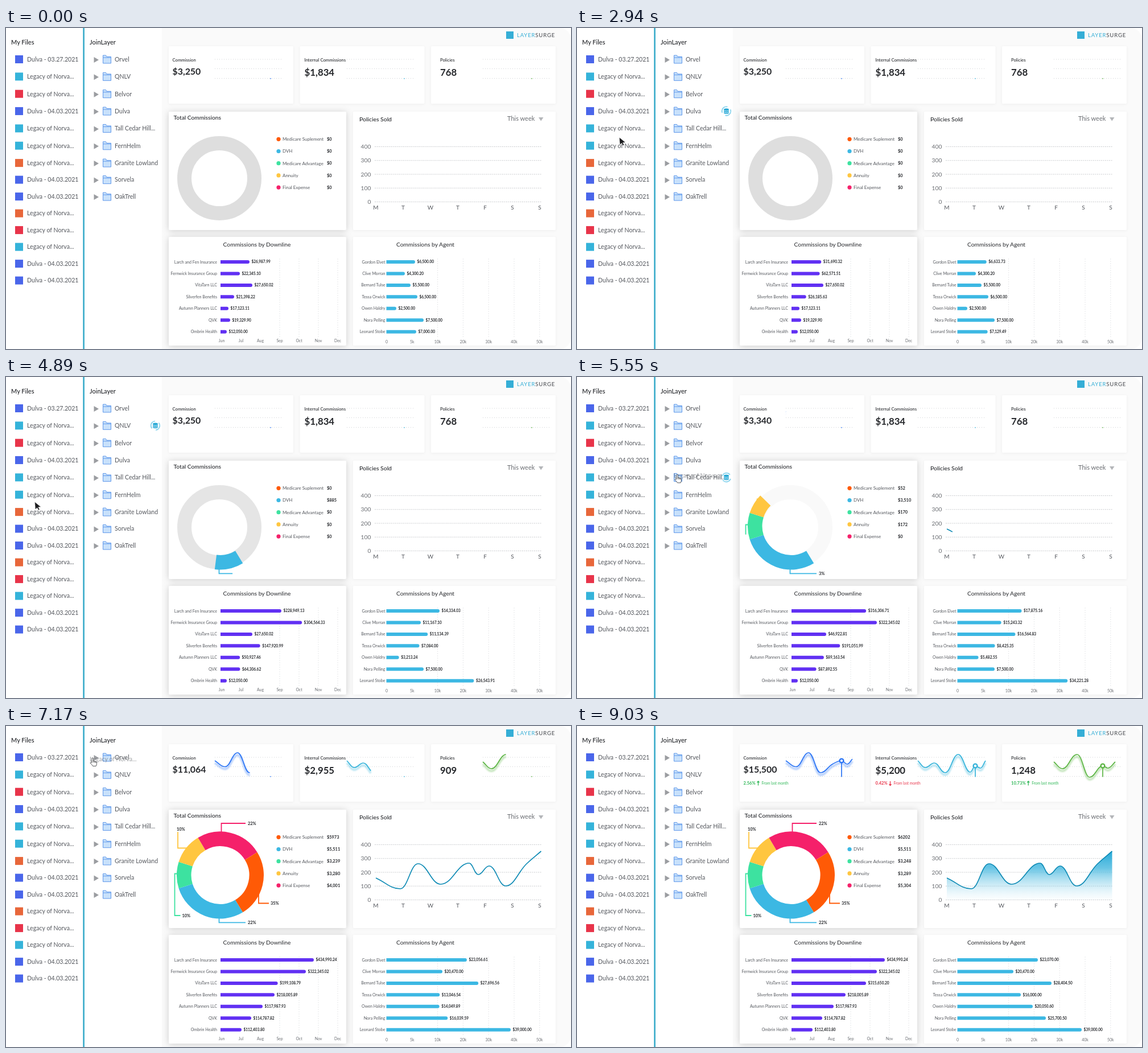
An HTML page that plays this animation: 993 by 564 pixels, repeating every 9930 ms.

```html
<!DOCTYPE html>
<html lang="en">
<head>
<meta charset="utf-8">
<title>Commission dashboard</title>
<style>
  html, body { margin: 0; width: 100%; height: 100%; overflow: hidden; background: #fff; }
  svg { display: block; width: 993px; height: 564px; font-family: Lato, "Open Sans", sans-serif; }
  .card { fill: #fff; filter: drop-shadow(0 1px 2px rgba(0, 0, 0, .05)); }
  .raised { filter: drop-shadow(0 1px 6px rgba(0, 0, 0, .18)); }
  .spin { animation: spin 1s linear infinite; }
  @keyframes spin { to { transform: rotate(360deg); } }
</style>
</head>
<body>
<svg id="stage" viewBox="0 0 993 564">
  <defs>
    <linearGradient id="area" x1="0" y1="0" x2="0" y2="1">
      <stop offset="0" stop-color="#25a9d8"/>
      <stop offset=".35" stop-color="#4fbbe0" stop-opacity=".85"/>
      <stop offset="1" stop-color="#bfe6f4" stop-opacity=".05"/>
    </linearGradient>
    <filter id="soft" x="-10%" y="-30%" width="120%" height="160%"><feGaussianBlur stdDeviation="1"/></filter>
  </defs>
</svg>
<script>
const LOOP = 9930, STEP = 30;
const INK = '#25272b', TEXT = '#55585e', MUTED = '#6a6d72';
const stage = document.getElementById('stage');
const updates = [];

// ---------- helpers ----------
const clamp = v => Math.max(0, Math.min(1, v));
const mix = (a, b, f) => a + (b - a) * f;
const ease = (t, t0, t1) => {
  const u = clamp((t - t0) / (t1 - t0));
  return u * u * (3 - 2 * u);
};
const easeInverse = f => 0.5 - Math.sin(Math.asin(1 - 2 * f) / 3);

function add(tag, attrs, parent = stage) {
  const el = document.createElementNS('http://www.w3.org/2000/svg', tag);
  for (const k in attrs) el.setAttribute(k, attrs[k]);
  parent.append(el);
  return el;
}

// y is the middle of the capital letters
function text(x, y, str, size, fill = TEXT, weight = 400, anchor = 'start', parent = stage) {
  const el = add('text', { x, y: y + size * 0.36, 'font-size': size, fill,
    'font-weight': weight, 'text-anchor': anchor }, parent);
  el.textContent = str;
  return el;
}

const rect = (x, y, width, height, attrs) => add('rect', { x, y, width, height, ...attrs });
const path = (d, attrs, parent) => add('path', { d, fill: 'none', ...attrs }, parent);
const dotted = (x1, y1, x2, y2, stroke, dash) =>
  add('line', { x1, y1, x2, y2, stroke, 'stroke-dasharray': dash });
const money = (v, digits) => '$' + v.toLocaleString('en-US',
  { minimumFractionDigits: digits, maximumFractionDigits: digits });

// Smooth curve through points, flat and round at peaks and valleys
function curve(pts) {
  const secant = pts.slice(1).map((p, i) => (p[1] - pts[i][1]) / (p[0] - pts[i][0]));
  const slope = pts.map((_, i) => {
    const a = secant[i - 1] ?? secant[i], b = secant[i] ?? a;
    return a * b <= 0 ? 0 : (a + b) / 2;
  });
  return pts.slice(1).reduce((d, [x, y], i) => {
    const [px, py] = pts[i], h = (x - px) * 0.42;
    return d + `C${px + h},${py + slope[i] * h} ${x - h},${y - slope[i + 1] * h} ${x},${y}`;
  }, `M${pts[0]}`);
}

// Draws a path from its start between two times
function drawOn(el, t0, t1) {
  const len = el.getTotalLength();
  el.setAttribute('stroke-dasharray', `${len} ${len + 20}`);
  updates.push(t => {
    const f = ease(t, t0, t1);
    el.setAttribute('stroke-dashoffset', len * (1 - f));
    el.setAttribute('visibility', f > 0 ? 'visible' : 'hidden');
  });
}

const fadeIn = (el, t0, t1) => updates.push(t => el.setAttribute('opacity', ease(t, t0, t1)));

// ---------- panels ----------
path('M274 0H973a20 20 0 0 1 20 20V544a20 20 0 0 1-20 20H274Z', { fill: '#fafafa' });
rect(135.3, 0, 2.6, 564, { fill: '#38abc9' });
for (const x of [286, 516.5, 747]) rect(x, 32, 219, 101, { class: 'card', rx: 2 });
for (const [y, h] of [[147, 208], [367, 191]]) {
  rect(286, y, 312, h, { class: 'card raised', rx: 2 });
  rect(610, y, 356, h, { class: 'card', rx: 2 });
}

// ---------- file and folder lists ----------
const rowY = i => 55 + 30.35 * Math.min(i, 6) + 29.5 * Math.max(0, i - 6);
const fileKinds = 'btrbttobbortbb';
const kindColor = { b: '#4a66ea', t: '#35b3da', r: '#e8344a', o: '#e8673a' };
const fileLabel = i => fileKinds[i] === 'b' ? `Dulva - ${i ? '04.03' : '03.27'}.2021` : 'Legacy of Norva...';

text(9, 25, 'My Files', 11, INK, 500);
text(147, 25, 'JoinLayer', 11, INK, 500);
[...fileKinds].forEach((kind, i) => {
  rect(16, rowY(i) - 7, 14, 14, { fill: kindColor[kind] });
  text(37, rowY(i), fileLabel(i), 10.6);
});
['Orvel', 'QNLV', 'Belvor', 'Dulva', 'Tall Cedar Hill...', 'FernHelm', 'Granite Lowland', 'Sorvela', 'OakTrell']
  .forEach((name, i) => {
    const y = rowY(i);
    path(`M154.5 ${y - 4}L163 ${y + 1} 154.5 ${y + 6}Z`, { fill: '#9b9da1' });
    path(`M170.5 ${y + 7}V${y - 7}h5l1.6 2.5h7.4V${y + 7}ZM170.5 ${y - 3}h14`,
      { fill: '#c8e1fb', stroke: '#5f98ea', 'stroke-width': 1 });
    text(191, y, name, 10.6);
  });

// ---------- brand ----------
rect(879, 6, 13, 13, { fill: '#35aed6' });
const brand = text(898, 12.5, '', 9.6, '#35aed6');
brand.setAttribute('letter-spacing', 0.8);
brand.innerHTML = 'LAYER<tspan fill="#45484d">SURGE</tspan>';

// ---------- summary cards ----------
// pin is the index of the marked point on the line
function summary({ x, chartX, label, size, valueY, from, to, prefix, count, color, line, draw, pin, change, up, show }) {
  text(x, 56, label, 7.7, INK, 500);
  const value = text(x, valueY, '', size, INK, 700);
  updates.push(t => value.textContent =
    prefix + Math.round(mix(from, to, ease(t, ...count))).toLocaleString('en-US'));

  for (const y of [55, 71.5, 88.5]) dotted(chartX, y, chartX + 119, y, '#cfd1d4', '1 3');
  const points = line.map(([dx, y]) => [chartX + dx, y]), d = curve(points);
  drawOn(path(d, { stroke: color, 'stroke-width': 4, opacity: 0.32, transform: 'translate(0 4)', filter: 'url(#soft)' }), ...draw);
  drawOn(path(d, { stroke: color, 'stroke-width': 1.7 }), ...draw);

  const [px, py] = points[pin];
  const stem = add('line', { x1: px, x2: px, y1: 89.5, stroke: color, 'stroke-width': 1.7 });
  const knob = add('circle', { cx: px, r: 3.4, fill: '#fff', stroke: color, 'stroke-width': 2.4 });
  updates.push(t => {
    const f = ease(t, 7800, 8450), y = mix(88.3, py, f);
    stem.setAttribute('y2', y);
    knob.setAttribute('cy', y);
    knob.setAttribute('opacity', clamp(f * 5));
  });

  const g = add('g', {}), tint = up ? '#2fb757' : '#e8344a';
  text(x, 100.5, change, 7.6, tint, 700, 'start', g);
  const ax = x + 5 + change.length * 4.2;
  path(`M${ax} 97v7.5` + (up ? 'm-2-5.2l2-2.3 2 2.3' : 'm-2-2.3l2 2.3 2-2.3'),
    { stroke: tint, 'stroke-width': 1.3 }, g);
  text(ax + 6, 100.8, 'From last month', 6.6, tint, 400, 'start', g);
  fadeIn(g, ...show);
}

summary({ x: 292.5, chartX: 367, label: 'Commission', size: 15.9, valueY: 76.5, from: 3250, to: 15500, prefix: '$',
  count: [5400, 8385], color: '#2a74f5', draw: [5490, 8490], pin: 5, change: '2.56%', up: true, show: [8300, 8750],
  line: [[0, 61], [18, 71.5], [40, 47], [61, 82], [82, 67], [98, 61], [108, 67], [117, 58]] });
summary({ x: 524.5, chartX: 599, label: 'Internal Commissions', size: 16.8, valueY: 77.5, from: 1834, to: 5200, prefix: '$',
  count: [6300, 8550], color: '#35b3da', draw: [6250, 8770], pin: 6, change: '0.42%', up: false, show: [8500, 9000],
  line: [[0, 61], [13, 73], [29, 65], [48, 82], [71, 50], [92, 81], [101, 70], [110, 74], [119, 61]] });
summary({ x: 763, chartX: 838, label: 'Policies', size: 16.8, valueY: 77.5, from: 768, to: 1248, prefix: '',
  count: [6378, 8586], color: '#5cb544', draw: [6253, 8570], pin: 4, change: '10.73%', up: true, show: [8600, 9030],
  line: [[0, 63], [15, 75], [41, 50], [63, 90], [86, 70], [95, 74], [108, 63]] });

// ---------- total commissions ----------
text(294.5, 157, 'Total Commissions', 10.2, INK, 500);
const ring = add('circle', { cx: 375, cy: 264, r: 61.5, fill: 'none', stroke: '#dedede', 'stroke-width': 25 });
updates.push(t => ring.setAttribute('opacity', 1 - ease(t, 4395, 6015)));

const SWEEP = [4395, 6831], FIRST_ANGLE = 58.7, RADIUS = 63.75;
const sweepTime = deg => mix(...SWEEP, easeInverse((deg - FIRST_ANGLE) / 360));
const polar = deg => {
  const a = deg * Math.PI / 180;
  return [376.5 + RADIUS * Math.cos(a), 262 + RADIUS * Math.sin(a)];
};

const slices = [
  { name: 'DVH', color: '#3cb8e3', end: 162.4, share: 22, leader: 'M374.5 338V345.3H421', tagAt: [425, 345], total: 5511, from: 4395 },
  { name: 'Medicare Advantage', color: '#3de2a0', end: 197.6, share: 10, leader: 'M301 259.5H296.5V333H306.5', tagAt: [309.5, 333], total: 3248, from: 5280 },
  { name: 'Annuity', color: '#ffc640', end: 239.3, share: 10, leader: 'M318 214.5H302V186', tagAt: [300, 181], total: 3289, from: 5280 },
  { name: 'Final Expense', color: '#f5206a', end: 328.2, share: 22, leader: 'M378.5 187V171H421', tagAt: [425, 171], total: 5304, from: 5850 },
  { name: 'Medicare Suplement', color: '#ff5a06', end: 418.7, share: 35, leader: 'M444 296V311.5H462', tagAt: [465, 311.5], total: 6202, from: 5445 }
];
slices.forEach(({ name, color, end, share, leader, tagAt, total, from }, i) => {
  const start = i ? slices[i - 1].end : FIRST_ANGLE;
  const entered = sweepTime(start);
  drawOn(path(leader, { stroke: color, 'stroke-width': 1.8 }), entered, entered + 900);
  const slice = path('', { stroke: color, 'stroke-width': 25.5 });
  const tag = text(...tagAt, '', 7.4, INK, 700);

  const legendY = 195.3 + 21.2 * ((i + 1) % slices.length);
  add('circle', { cx: 479, cy: legendY, r: 3.6, fill: color });
  text(486, legendY, name, 8);
  const value = text(564, legendY, '', 7.4, INK, 700);

  updates.push(t => {
    const tip = Math.min(end, FIRST_ANGLE + 360 * ease(t, ...SWEEP));
    slice.setAttribute('d', tip > start ? `M${polar(start)}A${RADIUS} ${RADIUS} 0 0 1 ${polar(tip)}` : '');
    const counted = 5346 + 181 * i;
    const n = Math.round(share * ease(t, counted, counted + 900));
    tag.textContent = n && t >= entered + 900 ? n + '%' : '';
    const sum = Math.round(total * ease(t, from, from + 1950));
    value.textContent = name.endsWith('Suplement') ? '$' + sum : money(sum, 0);
  });
});

// ---------- policies sold ----------
text(621, 160, 'Policies Sold', 10.4, INK, 500);
text(881, 159.5, 'This week', 11, MUTED);
path('M936 157H944.5L940.2 163.5Z', { fill: '#b4b6b9' });
for (let i = 0; i < 5; i++) {
  const y = 208.5 + 24.25 * i;
  text(641.5, y, 400 - i * 100, 10.3, MUTED, 400, 'end');
  dotted(648, y, 942, y, '#c9cbce', '2 1.5');
}
[...'MTWTFSS'].forEach((day, i) => text(650 + 48 * i, 315, day, 10, TEXT, 400, 'middle'));
const week = curve([[650, 267], [693, 286], [724, 242], [764, 278], [814, 241],
  [830, 261], [849, 246], [878, 281], [915, 242], [940.5, 220]]);
fadeIn(path(week + 'V305.5H650Z', { fill: 'url(#area)' }), 7300, 8400);
drawOn(path(week, { stroke: '#0f8bb5', 'stroke-width': 1.7 }), 5370, 7215);

// ---------- bar charts ----------
// Each row: name, values, bar ends and times, each as first and last
function barChart({ title, titleX, nameX, left, color, ticks, tickX, tickY, firstGrid, rows }) {
  text(titleX, 380.5, title, 10.3, INK, 400, 'middle');
  ticks.forEach((label, i) => {
    const x = tickX(i);
    if (i >= firstGrid) dotted(x, 405, x, 545, '#e6e7e9', '2 2');
    text(x, tickY, label, 6.9, MUTED, 400, 'middle');
  });
  rows.forEach(([name, values, ends, times], i) => {
    const y = 411 + 20.45 * i;
    text(nameX, y, name, 7.1, TEXT, 400, 'end');
    const bar = path('', { fill: color });
    const value = text(0, y, '', 6.5, INK, 700);
    updates.push(t => {
      const f = ease(t, ...times), x = mix(...ends, f);
      bar.setAttribute('d', `M${left} ${y - 3}H${x - 3}a3 3 0 0 1 0 6H${left}Z`);
      value.setAttribute('x', x + 3.5);
      value.textContent = money(mix(...values, f), 2);
    });
  });
}

barChart({
  title: 'Commissions by Downline', titleX: 441, nameX: 371, left: 377, color: '#6130f3',
  ticks: ['Jun', 'Jul', 'Aug', 'Sep', 'Oct', 'Nov', 'Dec'], tickX: i => 379 + 34 * i, tickY: 549.5, firstGrid: 3,
  rows: [
    ['Larch and Fen Insurance', [26987.99, 434990.24], [428, 541], [2655, 7155]],
    ['Fernwick Insurance Group', [22345.10, 322345.02], [411, 527], [2220, 5354]],
    ['VitaTarn LLC', [27650.02, 315650.20], [433, 508], [4920, 8910]],
    ['Silverfen Benefits', [21398.22, 218005.89], [401, 472], [2580, 6450]],
    ['Autumn Planners LLC', [17123.11, 117987.93], [391, 451], [3900, 6450]],
    ['QVK', [19329.90, 114787.82], [394, 431], [3015, 6915]],
    ['Ombrin Health', [12050, 112403.80], [388, 414], [5550, 6450]]
  ]
});
barChart({
  title: 'Commissions by Agent', titleX: 737, nameX: 666.5, left: 668.5, color: '#3cb8e3',
  ticks: ['0', '5k', '10k', '20k', '30k', '40k', '50k'], tickX: i => 669 + 44.8 * i, tickY: 551.5, firstGrid: 2,
  rows: [
    ['Gordon Elvet', [6500, 23070], [719, 810], [2700, 7245]],
    ['Clive Morran', [4300.20, 20470], [701, 767], [3150, 7020]],
    ['Bernard Tulse', [5500, 28404.50], [711, 834], [3600, 7590]],
    ['Tessa Orwick', [6500, 16000], [723, 780], [4170, 8940]],
    ['Owen Haldry', [2500, 20050.60], [686, 801], [4320, 9015]],
    ['Nora Pelling', [7500, 25700.50], [734, 824], [5595, 8880]],
    ['Leonard Stobe', [7000, 39000], [721, 887], [2805, 6435]]
  ]
});

// ---------- drag and drop ----------
// A trip walks to a file, grips it at an offset from its label, and drags it to a folder
const trips = [
  { file: 0, folder: 3, grip: [19, -3], walk: [330, 1320], drag: [1650, 2220] },
  { file: 5, folder: 1, grip: [1, 5], walk: [2520, 3160], drag: [3400, 4080] },
  { file: 6, folder: 4, grip: [1, -3], walk: [4420, 5000], drag: [5080, 5500] },
  { file: 1, folder: 0, grip: [0, -3], walk: [5750, 6350], drag: [6600, 7380] }
];
for (const trip of trips) {
  trip.pick = [37 + trip.grip[0], rowY(trip.file) + trip.grip[1]];
  trip.drop = [171, rowY(trip.folder) - 6];
}

const spinner = add('g', {});
add('circle', { class: 'spin', r: 7.8, fill: 'none', stroke: '#5cc3e6', 'stroke-width': 1.3,
  pathLength: 360, 'stroke-dasharray': '125 55' }, spinner);
path('M-4.3-3.2a4.3 1.6 0 0 1 8.6 0v6.4a4.3 1.6 0 0 1-8.6 0Z', { fill: '#27a9d6' }, spinner);
path('M-4.3-1.6a4.3 1.5 0 0 0 8.6 0M-4.3 1.2a4.3 1.5 0 0 0 8.6 0', { stroke: '#fff', 'stroke-width': 0.8 }, spinner);

const ghost = text(0, 0, '', 10.6, '#6f7277');
const cursor = add('g', {});
const arrow = path('M0 0L10.8 8.8 6.2 9.3 8.6 13.4 6.4 14.4 4.2 10.2 1 13.2Z',
  { fill: '#1c1c1e', stroke: '#fff', 'stroke-width': 0.5 }, cursor);
const hand = path('M3.6 9.6V2.2a1.2 1.2 0 0 1 2.5 0V6.6q2-.8 2.3.6 1.9-.6 2.1.7 1.8-.3 1.8 1.3V11.5q0 1.8-1.2 4H5.5Q4 12.6 1 10.2 1.2 7.8 3.6 9.6Z' +
  'M6.1 6.6V9.4M8.4 7.2V9.6M10.5 7.9V9.8',
  { fill: '#fff', stroke: '#2a2c30', 'stroke-width': 0.8 }, cursor);

updates.push(t => {
  let [x, y] = [503, 317], trip;
  for (const next of trips) {
    if (t < next.walk[0]) break;
    trip = next;
    const walked = ease(t, ...trip.walk), dragged = ease(t, ...trip.drag);
    x = mix(mix(x, trip.pick[0], walked), trip.drop[0], dragged);
    y = mix(mix(y, trip.pick[1], walked), trip.drop[1], dragged);
  }
  const holding = trip && t >= trip.walk[1] + 30;
  const dropped = trip ? t - trip.drag[1] : -1;
  cursor.setAttribute('visibility', t >= 180 && t < 7710 ? 'visible' : 'hidden');
  cursor.setAttribute('transform', `translate(${x} ${y})`);
  arrow.setAttribute('display', holding ? 'none' : 'inline');
  hand.setAttribute('display', holding ? 'inline' : 'none');

  const dragging = trip && t >= trip.drag[0];
  ghost.setAttribute('opacity', dragging ? 0.65 * (1 - ease(dropped, 60, 200)) : 0);
  if (dragging) {
    ghost.textContent = fileLabel(trip.file);
    ghost.setAttribute('transform', `translate(${x - trip.grip[0]} ${y - trip.grip[1]})`);
  }

  const synced = trips.find(({ drag }) => t > drag[1] && t < drag[1] + 1320);
  spinner.setAttribute('visibility', synced ? 'visible' : 'hidden');
  if (synced) spinner.setAttribute('transform', `translate(262.5 ${rowY(synced.folder)})`);
});

// ---------- clock ----------
function frame() {
  const t = Math.floor(performance.now() % LOOP / STEP) * STEP;
  for (const update of updates) update(t);
  requestAnimationFrame(frame);
}
frame();
</script>
</body>
</html>
```
